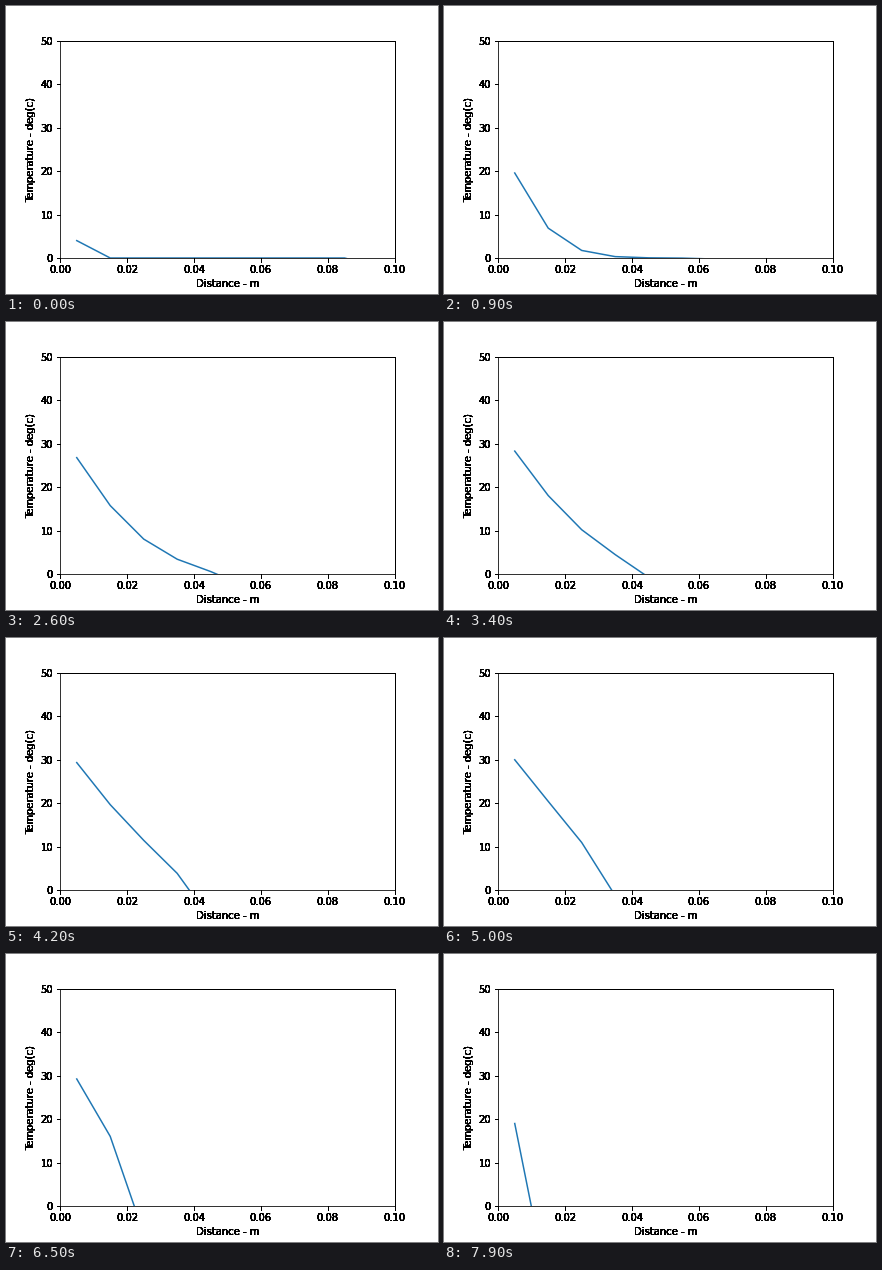
Write a matplotlib script that moves like this. It is 432 by 288 pixels and loops after 8 s.

```python
import matplotlib.pyplot as plt
import numpy as np
from matplotlib.animation import FuncAnimation

FRAMES, INTERVAL = 80, 100
CELLS, LENGTH = 10, 0.1
LEFT, RIGHT = 40, 20          # wall temperatures
RATE = 0.1                    # alpha * dt / dx**2

dx = LENGTH / CELLS
x = np.linspace(dx / 2, LENGTH - dx / 2, CELLS)


def heat_step(temp):
    """Explicit diffusion step; the right wall feeds back and runs away."""
    flow = np.empty(CELLS)
    flow[1:-1] = temp[:-2] - 2 * temp[1:-1] + temp[2:]
    flow[0] = LEFT - 2 * temp[0] + temp[1]
    flow[-1] = temp[-2] + temp[-1] - RIGHT
    return temp + RATE * flow


def solve():
    temp, rows = np.zeros(CELLS), []
    for _ in range(FRAMES):
        temp = heat_step(temp)
        rows.append(temp)
    return rows


def harden(artist, passes=12):
    """Draw repeatedly so that soft edges turn solid black."""
    draw = artist.draw

    def solid(renderer):
        for _ in range(passes):
            draw(renderer)

    artist.draw = solid


plt.rcParams.update({"font.family": "DejaVu Sans", "font.size": 10})
fig, ax = plt.subplots(figsize=(6, 4), dpi=72)
fig.subplots_adjust(left=0.125, right=0.9, bottom=0.125, top=0.88)
ax.set(xlim=(0, LENGTH), ylim=(0, 50),
       xticks=np.linspace(0, LENGTH, 6), yticks=range(0, 51, 10),
       xlabel="Distance - m", ylabel="Temperature - deg(c)")
ax.xaxis.set_major_formatter("{x:.2f}")
line, = ax.plot([], [], color="#1f77b4", lw=1.5)

for axis in (ax.xaxis, ax.yaxis):
    harden(axis.label)
    for tick in axis.get_major_ticks():
        harden(tick.label1)
        harden(tick.tick1line)
for side in ("top", "right"):
    harden(ax.spines[side])

profiles = solve()


def update(i):
    line.set_data(x, profiles[i])
    return line,


anim = FuncAnimation(fig, update, frames=FRAMES, interval=INTERVAL,
                     repeat=True, repeat_delay=0)
plt.show()
```
